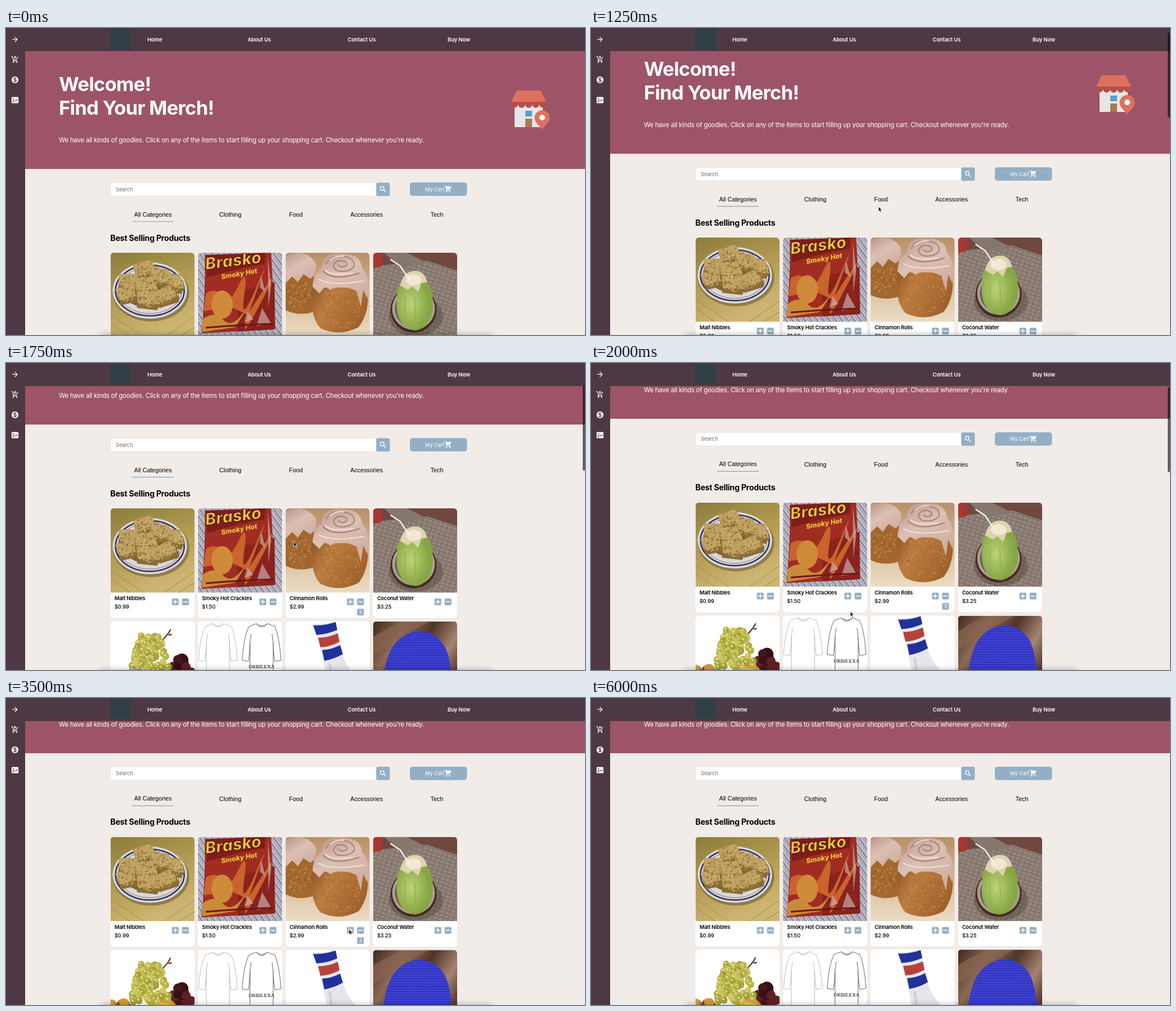
An HTML page for the animation above (6250 ms loop, 1028 px wide and 545 px high).

```html
<!DOCTYPE html>
<html lang="en">
<head>
<meta charset="utf-8">
<title>Merch store</title>
<style>
html, body { margin: 0; height: 100%; overflow: hidden; background: #f1ece8; }
svg { display: block; width: 1028px; height: 545px; font-family: Inter, sans-serif; font-optical-sizing: none; }
.title { font-size: 34.5px; font-weight: 700; letter-spacing: -.72px; fill: #fff; }
.intro { font-size: 11.4px; letter-spacing: -.22px; fill: #fff; }
.nav { font-size: 9.5px; font-weight: 600; letter-spacing: -.12px; fill: #fff; }
.tabs { font: 10.74px "Liberation Sans", Arial, sans-serif; }
.heading { font-size: 14.2px; font-weight: 700; letter-spacing: -.26px; }
.name { font-size: 9.4px; font-weight: 600; letter-spacing: -.18px; }
.price { font-size: 9.3px; font-weight: 500; letter-spacing: -.1px; }
.field { font-size: 9.3px; letter-spacing: -.06px; }
.photo { filter: blur(.6px); }
</style>
</head>
<body>
<svg viewBox="0 0 1028 545">
  <defs>
    <clipPath id="photoClip"><path d="M0 149.4V6a6 6 0 0 1 6-6h137.4a6 6 0 0 1 6 6v143.4z"/></clipPath>
    <linearGradient id="wood" x2=".4" y2="1"><stop stop-color="#8b7c3c"/><stop offset=".55" stop-color="#b39c52"/><stop offset="1" stop-color="#cdb574"/></linearGradient>
    <linearGradient id="cream" y2="1" x2="0"><stop stop-color="#b98f68"/><stop offset=".6" stop-color="#d9c0a0"/><stop offset="1" stop-color="#ecdcc4"/></linearGradient>
    <linearGradient id="crust" x2="1" y2=".4"><stop stop-color="#8f5726"/><stop offset=".35" stop-color="#bd7c3f"/><stop offset="1" stop-color="#a0622c"/></linearGradient>
    <linearGradient id="icing" x2=".6" y2="1"><stop stop-color="#b9958a"/><stop offset=".5" stop-color="#dcc0b4"/><stop offset="1" stop-color="#cfae9f"/></linearGradient>
    <linearGradient id="satin" x2="1" y2=".6"><stop stop-color="#3e2820"/><stop offset=".3" stop-color="#8d6a56"/><stop offset=".55" stop-color="#50342a"/><stop offset=".8" stop-color="#a58370"/><stop offset="1" stop-color="#54382d"/></linearGradient>
    <radialGradient id="shell" cx=".4"><stop stop-color="#bcd378"/><stop offset="1" stop-color="#86a543"/></radialGradient>
    <pattern id="stripes" width="9" height="9" patternUnits="userSpaceOnUse" patternTransform="rotate(-35)">
      <rect width="9" height="9" fill="#c3c4cd"/><rect width="3" height="9" fill="#858ca8"/><rect x="6" width="1" height="9" fill="#a5787c"/>
    </pattern>
    <pattern id="tiles" width="9" height="7" patternUnits="userSpaceOnUse" patternTransform="rotate(18)">
      <rect width="9" height="7" fill="#8d7f76"/><path d="M0 0h9M0 0v7" stroke="#76675f" stroke-width="1.4"/><rect x="4" y="3" width="3" height="2" fill="#a0938a"/>
    </pattern>
    <pattern id="crochet" width="5" height="4.5" patternUnits="userSpaceOnUse">
      <rect width="5" height="4.5" fill="#4347dc"/><path d="M0 .5l2.5 2.5L5 .5" fill="none" stroke="#2628a8" stroke-width="1.2"/>
    </pattern>
    <path id="cart" d="M7 18c-1.1 0-2 .9-2 2s.9 2 2 2 2-.9 2-2-.9-2-2-2zM1 2v2h2l3.6 7.59-1.35 2.45c-.16.28-.25.61-.25.96 0 1.1.9 2 2 2h12v-2H7.42c-.14 0-.25-.11-.25-.25l.03-.12.9-1.63h7.45c.75 0 1.41-.41 1.75-1.03l3.58-6.49c.08-.14.12-.31.12-.48 0-.55-.45-1-1-1H5.21l-.94-2H1zm16 16c-1.1 0-2 .9-2 2s.9 2 2 2 2-.9 2-2-.9-2-2-2z"/>
  </defs>

  <g id="page">
    <path d="M34 0h994v250.3H34z" fill="#9d5468"/>
    <text class="title" x="94" y="112">Welcome!</text>
    <text class="title" x="94" y="154">Find Your Merch!</text>
    <text class="intro" x="94" y="203">We have all kinds of goodies. Click on any of the items to start filling up your shopping cart. Checkout whenever you're ready.</text>

    <path d="M903 132h50v44h-50z" fill="#e6e6e6"/>
    <path d="M922 147h12v10h-12z" fill="#5a9fc9"/>
    <path d="M922 161h12v15h-12z" fill="#a47c50"/>
    <path d="M897 130.5h62v4a6.2 6.2 0 0 1-12.4 1 6.2 6.2 0 0 1-12.4 0 6.2 6.2 0 0 1-12.4 0 6.2 6.2 0 0 1-12.4 0 6.2 6.2 0 0 1-12.4-1z" fill="#b54f48"/>
    <path d="M897 131l10-20h42l10 20z" fill="#dd7160"/>
    <path d="M952 181c-3-7-13.5-12-13.5-21.5a13.5 13.5 0 0 1 27 0c0 9.5-10.5 14.5-13.5 21.5z" fill="#dd7160"/>
    <circle cx="952" cy="159" r="5" fill="#fff"/>

    <rect x="185.5" y="274.7" width="476" height="23.3" rx="4" fill="#fff" stroke="#e6e2df" stroke-width=".7"/>
    <rect x="657.3" y="274.5" width="24.2" height="23.7" rx="3" fill="#94afc5"/>
    <path d="M671 287.8l3.3 3.3" stroke="#fff" stroke-width="1.5"/>
    <circle cx="668" cy="284.8" r="3.3" fill="none" stroke="#fff" stroke-width="1.4"/>
    <text class="field" x="195" y="289.5" fill="#6d6d6d">Search</text>
    <rect x="717" y="274.3" width="101.5" height="23.8" rx="5" fill="#94afc5"/>
    <text class="field" x="744" y="289.7" fill="#fff">My Cart</text>
    <use href="#cart" transform="translate(778 278.8) scale(.6)" fill="#fff"/>

    <g class="tabs">
      <text x="227.5" y="334.5">All Categories</text><text x="378.6" y="335.2">Clothing</text>
      <text x="502.6" y="335.2">Food</text><text x="611.3" y="335.2">Accessories</text><text x="753.8" y="335.2">Tech</text>
    </g>
    <path id="underline" d="M224 343.7h74" stroke-width="1.3"/>
    <text class="heading" x="185.3" y="377.8">Best Selling Products</text>
    <g id="row1" transform="translate(185.4 399)"></g>
    <g id="row2"></g>
  </g>

  <path d="M0 0h1028v41H34v504H0z" fill="#4e3843"/>
  <rect x="185.5" y="1.5" width="36.5" height="36.5" fill="#2f3f45"/>
  <g class="nav">
    <text x="251" y="24">Home</text><text x="429" y="24">About Us</text>
    <text x="606.5" y="24">Contact Us</text><text x="784" y="24">Buy Now</text>
  </g>
  <g fill="#fff">
    <path transform="translate(8.8 13) scale(.6)" d="M12 4l-1.41 1.41L16.17 11H4v2h12.17l-5.58 5.59L12 20l8-8z"/>
    <path transform="translate(8.8 48.8) scale(.6)" d="M11 9h2V6h3V4h-3V1h-2v3H8v2h3v3zm-4 9c-1.1 0-2 .9-2 2s.9 2 2 2 2-.9 2-2-.9-2-2-2zm10 0c-1.1 0-2 .9-2 2s.9 2 2 2 2-.9 2-2-.9-2-2-2zm-9.83-3.25l.03-.12.9-1.63h7.45c.75 0 1.41-.41 1.75-1.03l3.86-7.01L19.42 4h-.01l-1.1 2-2.76 5H8.53l-.13-.27L6.16 6l-.95-2-.94-2H1v2h2l3.6 7.59-1.35 2.45c-.16.28-.25.61-.25.96 0 1.1.9 2 2 2h12v-2H7.42c-.13 0-.25-.11-.25-.25z"/>
    <circle cx="16" cy="92" r="6.1"/>
    <rect x="9.9" y="122.6" width="12.2" height="10.8" rx="1.2"/>
  </g>
  <text x="16" y="95.5" text-anchor="middle" font-size="9.8" font-weight="700" fill="#4e3843">$</text>
  <path d="M11.5 125.7h3.6M11.5 128.2h3.6M11.5 130.6h3.6M16.3 128.2l1.4 1.4 2.9-2.9" fill="none" stroke="#4e3843" stroke-width="1.1"/>

  <rect x="163" y="546" width="704" height="24" rx="10" opacity=".38" style="filter:blur(6px)"/>
  <rect id="thumb" x="1024" width="4" height="151" rx="2"/>
  <path id="cursor" d="M0 0v9l2-1.8 1.5 3.2 1.5-.7-1.5-3.1H6.2z" stroke="#fff" stroke-width=".8"/>
</svg>

<script>
const $ = id => document.getElementById(id);
let seed = 11;
const rand = () => (seed = seed * 16807 % 2147483647) / 2147483647;
const repeat = (n, draw) => Array.from({ length: n }, (_, i) => draw(i)).join('');
const path = (d, fill, extra = '') => `<path d="${d}" fill="${fill}" ${extra}/>`;
const line = (d, color, width) => path(d, 'none', `stroke="${color}" stroke-width="${width}"`);
const oval = (x, y, rx, ry, fill, extra = '') => `<ellipse cx="${x}" cy="${y}" rx="${rx}" ry="${ry}" fill="${fill}" ${extra}/>`;
const back = fill => path('M0 0h150v150H0z', fill);

// Random specks spread evenly over an ellipse
const specks = (n, cx, cy, rx, ry, size, colors) => repeat(n, i => {
  const angle = rand() * 2 * Math.PI, reach = Math.sqrt(rand()), r = size * (.6 + .6 * rand());
  return oval(cx + rx * reach * Math.cos(angle), cy + ry * reach * Math.sin(angle), r, r, colors[i % colors.length]);
});

const treat = (x, y, turn) => `<g transform="translate(${x} ${y}) rotate(${turn}) scale(1.12)">
  ${path('M-19-9L9-15 21 5 18 15-14 17z', '#8a6c36')}${path('M-19-9L9-15 21 5-14 9z', '#c0a264')}
  ${specks(75, 1, 0, 17, 13, 1.3, ['#cfb478', '#a5853f', '#c4a663', '#8f7038'])}</g>`;

const shirt = (x, color) => `<g transform="translate(${x})" fill="none" stroke="${color}" stroke-width=".9">
  <path d="M26 4Q36 12 46 4L59 9Q67 26 70 69L59 71Q56 50 56 38V150H15V38Q15 50 12 71L1 69Q4 26 13 9z"/>
  <path d="M26 4Q36 16 46 4M56 38Q55 28 54 22M15 38Q16 28 17 22"/></g>`;

const riceTreats = () => back('url(#wood)')
  + line('M0 110l60 40M0 125l35 25M95 150l55-38M120 150l30-18', '#a38a48', 1)
  + oval(72, 71, 68, 51, '#5e4d25', 'opacity=".5"') + oval(70, 67, 66, 50, '#d9d7d8')
  + oval(70, 67, 61, 45, 'none', 'stroke="#2a3060" stroke-width="2.5"')
  + oval(70, 67, 57, 41, 'none', 'stroke="#a06a5c" stroke-width="1"')
  + oval(70, 66, 49, 32, '#7d6230')
  + treat(110, 52, 15) + treat(62, 30, -5) + treat(88, 42, 25) + treat(34, 52, 12) + treat(31, 72, -8)
  + treat(62, 58, 8) + treat(98, 76, -14) + treat(66, 82, 10);

const snackBag = () => back('url(#stripes)') + path('M12 4L130 0 137 136 6 143Q14 70 12 4z', '#a02c22')
  + path('M14 4L120 0 118 20Q60 30 16 44z', '#7e1d1a')
  + path('M70 70L136 52 137 136 70 140z', '#8a221d')
  + path('M14 72Q34 60 44 78T72 58 82 76 104 60 98 86 112 88 88 110L58 96 10 104z', '#c9642c')
  + path('M8 118Q30 102 44 118T76 112 66 132L7 141z', '#c98a3a')
  + oval(43, 92, 19, 25, '#d08a3c')
  + path('M124 6l6 52-5 40zM112 40l8 30-10-8zM114 98l16 28-26 4zM88 104l10 14-16 6z', '#cdb4b2', 'opacity=".65"')
  + line('M14 133Q70 128 134 126', '#6e1614', 3)
  + `<g fill="#ecc63a" font-style="italic" font-weight="800"><text transform="translate(14 30) rotate(-7)" font-size="29" stroke="#4c1010" stroke-width="1">Brasko</text>
     <text transform="translate(42 47) rotate(-10)" font-size="12">Smoky Hot</text></g>`;

const cinnamonRoll = () => back('url(#cream)')
  + path('M0 18Q30-2 50 26L52 104Q25 114 0 102z', '#a2682f')
  + specks(110, 24, 76, 24, 26, 1.6, ['#b47a40', '#925a28', '#be8549'])
  + path('M0 6Q34-10 54 18 56 40 44 46L32 38 22 52 12 42 0 54z', 'url(#icing)')
  + path('M48 62Q42 112 62 134 96 150 130 132 150 106 146 62z', 'url(#crust)')
  + specks(260, 96, 98, 42, 36, 1.2, ['#c08348', '#a0652e', '#c98f55', '#aa6d34'])
  + path('M48 60Q50 34 64 28 66-2 98 2 134 0 136 28 150 38 146 82L138 66 134 96 126 68Q98 54 80 66L70 60 60 72z', 'url(#icing)')
  + line('M66 32Q84 52 132 36M72 20Q80 4 98 6 124 8 122 24 112 36 92 32 78 22 94 14 112 14 108 23 98 28 94 21', '#a58074', 2)
  + line('M58 46Q80 60 140 50M70 30Q80 42 120 36M78 14Q88 4 104 6', '#f0e0d8', 2);

const coconut = () => back('url(#tiles)') + path('M0 0h150v32L96 14 0 24z', '#70483f')
  + path('M20 0h40l36 18-50 8z', '#85776e') + path('M0 0h16v24l-16 4z', '#a83630')
  + oval(76, 112, 48, 36, '#4a3f36', 'opacity=".4"')
  + oval(72, 101, 41, 41, '#4a2a24') + oval(72, 99, 38, 38, '#a89f90') + oval(72, 99, 33, 34, '#6b6053')
  + path('M43 66Q50 48 60 44L94 46Q108 68 106 94 102 136 74 138 43 132 42 94z', 'url(#shell)')
  + path('M48 58Q54 32 74 32 92 32 96 52L86 54 80 70 70 60 62 66z', '#ddd3ae') + oval(72, 48, 14, 10, '#f0e8d2')
  + line('M58 78Q54 110 62 134M92 74Q100 100 90 130M74 78Q76 110 75 136', '#8fae4c', 1.4)
  + line('M31 12L48 23 66 50', '#f4f2ee', 2.4);

const fruit = () => back('#fff') + line('M84 40Q100 28 107 14M103 24l6-1', '#5a4128', 2.4)
  + specks(14, 128, 86, 20, 20, 10, ['#43171c', '#5e2226', '#351014'])
  + specks(14, 16, 102, 18, 12, 9, ['#4e2a20', '#d69a3a', '#7a3f26'])
  + oval(94, 104, 24, 18, '#e39a2c') + oval(94, 106, 18, 13, '#f1bf52')
  + repeat(90, i => {
    const y = 26 + i * .75, x = 70 + (rand() - .5) * (36 + i * .45);
    return oval(x, y, 6, 6.5, ['#b9b444', '#a3a23a', '#cac45c'][i % 3]) + oval(x - 1.5, y - 2, 2, 2, '#e0dc94');
  });

const shirts = () => back('#fff') + shirt(0, '#b5b5b5') + shirt(77.5, '#555')
  + '<text x="113" y="83.5" text-anchor="middle" font-size="9" font-family="Liberation Serif, serif">ORBILEXA</text>';

const sock = () => back('#fff') + path('M48 4Q68 6 88 0L98 48Q104 74 124 98L128 150H70L72 92Q62 40 48 4z', '#e6e6ea')
  + path('M49 7Q70 8 89 1L92 15Q74 23 55 24z', '#20329a') + path('M58 29Q76 29 93 21L96 36Q80 45 62 46z', '#b5433c')
  + path('M65 51Q82 50 97 42L102 58Q86 67 69 70z', '#20329a') + line('M78 74Q84 96 80 150', '#cfcfd6', 4);

const hat = () => back('url(#satin)') + path('M0 28Q40 2 60 0L100 0Q60 22 0 60z', '#8a6450', 'opacity=".7"')
  + path('M15 150Q16 66 40 38 58 18 84 17 116 20 130 50 142 80 142 150z', 'url(#crochet)');

const chip = (x, y, mark) => `<g transform="translate(${x} ${y})"><rect x="-6" y="-6" width="12" height="12" rx="2" fill="#94afc5"/>${mark}</g>`;
const card = (i, photo, name = '', price = '') => `<g transform="translate(${i * 155.4})">
  <rect class="card" width="149.4" rx="6" fill="#fff"/>
  <g clip-path="url(#photoClip)"><g class="photo">${photo()}</g></g>
  ${name && `<text class="name" x="7.3" y="163.4">${name}</text><text class="price" x="7.3" y="178">${price}</text>
  ${chip(115.2, 166, line('M-4 0h8M0-4v8', '#fff', 1.5))}${chip(133.2, 166, line('M-4 0h8', '#fff', 1.5))}`}</g>`;

$('row1').innerHTML = card(0, riceTreats, 'Malt Nibbles', '$0.99') + card(1, snackBag, 'Smoky Hot Crackles', '$1.50')
  + card(2, cinnamonRoll, 'Cinnamon Rolls', '$2.99') + card(3, coconut, 'Coconut Water', '$3.25')
  + `<g id="badge">${chip(444, 184.2, '<text id="count" y="3.3" text-anchor="middle" font-size="9" fill="#fff"></text>')}</g>`;
$('row2').innerHTML = [fruit, shirts, sock, hat].map((photo, i) => card(i, photo)).join('');

// [start time, values...]
const scrolls = [[0, 0], [1250, 27], [1500, 109], [1750, 141], [2000, 151.3], [2250, 152.4]];
const counts = [[0, 3], [5000, 2], [5250, 1], [5500, 0]];
const thumbs = [[0, 0], [1250, .6], [2750, .2], [3000, 0]];
const cursors = [[0, -50, 0], [750, 557, 242], [1000, 510.5, 317], [2000, 460.5, 441], [2250, 455, 437.5], [2750, 463.5, 433],
  [3000, 579, 427], [3250, 609, 409], [3500, 609, 410.5], [4000, 608.5, 412], [4250, 609, 414], [4750, 626.5, 412], [5750, 630, 294.5], [6000, -50, 0]];
const at = (steps, t) => steps.filter(step => step[0] <= t).pop().slice(1);
const set = (id, name, value) => $(id).setAttribute(name, value);

function draw(now) {
  const t = now % 6250;
  const [scroll] = at(scrolls, t), [count] = at(counts, t);
  const height = count ? 194.6 : 193.8;
  set('page', 'transform', `translate(0 ${-scroll})`);
  set('row2', 'transform', `translate(185.4 ${405.1 + height})`);
  document.querySelectorAll('.card').forEach(c => c.setAttribute('height', height));
  set('underline', 'stroke', t < 750 ? '#aaa8a8' : '#82a5c4');
  set('badge', 'opacity', count ? 1 : 0);
  $('count').textContent = count;
  set('thumb', 'y', .5 + scroll * .28);
  set('thumb', 'opacity', at(thumbs, t)[0]);
  set('cursor', 'transform', `translate(${at(cursors, t)})`);
  requestAnimationFrame(draw);
}
draw(0);
</script>
</body>
</html>
```
